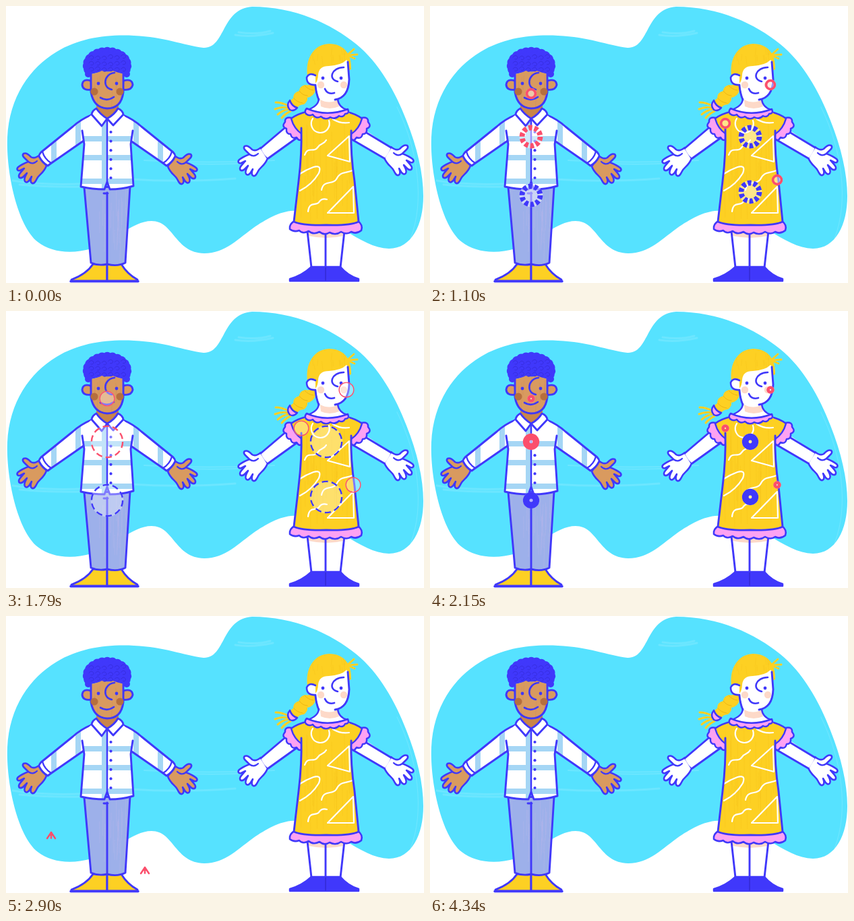
Animation of 620 by 411 pixels, one loop 4.57 s. Source, as an HTML page with a canvas:

```html
<!DOCTYPE html>
<html lang="en">
<head>
<meta charset="utf-8">
<title>Two kids</title>
<style>
html, body { margin: 0; width: 620px; height: 411px; overflow: hidden; background: #fff; }
canvas { display: block; }
</style>
</head>
<body>
<canvas id="stage" width="620" height="411"></canvas>
<script>
const LOOP = 4570;
const INK = '#4038fb', RED = '#fb4f6c', TAN = '#d99a5f', SKY = '#56e2ff';
const YELLOW = '#fdd023', PINK = '#fda2f3', PEACH = '#fdd9c8', STRIPE = '#a5d6f5';
const stage = document.getElementById('stage').getContext('2d');
const still = document.createElement('canvas');
still.width = 620;
still.height = 411;
const g = still.getContext('2d');
g.lineCap = g.lineJoin = 'round';

function shape(d, fill, line, width = 2.9) {
  const p = new Path2D(d);
  if (fill) { g.fillStyle = fill; g.fill(p); }
  if (line) { g.strokeStyle = line; g.lineWidth = width; g.stroke(p); }
}

function dot(x, y, r, fill) {
  g.beginPath();
  g.arc(x, y, r, 0, Math.PI * 2);
  g.fillStyle = fill;
  g.fill();
}

function placed(dx, dy, flip, draw) {
  g.save();
  g.translate(dx, dy);
  if (flip) g.scale(-1, 1);
  draw();
  g.restore();
}

function clipped(d, draw) {
  g.save();
  g.clip(new Path2D(d));
  draw();
  g.restore();
}

let seed = 7;
function rnd() {
  seed = (seed * 16807) % 2147483647;
  return seed / 2147483647;
}

// Faint dry-brush lines inside the current clip.
function grain(x, y, w, h, n, color) {
  for (let i = 0; i < n; i++) {
    const a = x + rnd() * w, b = y + rnd() * h * 0.6;
    shape(`M${a} ${b}l${rnd() * 3 - 1.5} ${h * (0.2 + rnd() * 0.3)}`, null, color, 0.8);
  }
}

function hand(fill) {
  shape('M50 221C45 225 40 226 37 224C34 221 30 217 26 219C23 222 27 225 29 227L33 231' +
    'C28 233 22 236 18 239C15 242 17 245 21 244L27 241C23 246 19 249 19 252' +
    'C19 256 23 256 26 253L31 248C28 253 26 257 28 260C30 263 33 261 35 258' +
    'L38 253C36 258 36 262 39 263C42 264 44 260 46 256C49 250 56 248 60 237Z', fill, INK, 2.6);
  shape('M33 231Q40 236 46 230', null, INK, 2.2);
}

function background() {
  const blob = 'M2 195C5 135 35 92 75 68C110 47 150 42 190 44C235 46 262 58 293 62' +
    'C326 63 319 4 365 1C428 1 482 26 520 57C553 84 577 126 594 170C610 210 619 249 619 282' +
    'C619 324 602 360 568 360C525 359 482 309 440 304C412 301 392 313 370 327' +
    'C344 345 326 367 294 367C250 366 249 319 216 319C186 319 161 351 127 360' +
    'C95 369 67 365 47 350C17 326 0 247 2 195Z';
  shape(blob, SKY);
  clipped(blob, () => {
    const brush = 'rgba(255,255,255,.13)';
    shape('M340 43Q365 47 396 40M345 39Q372 43 392 37', null, brush, 3);
    shape('M205 229Q300 234 398 229M230 232Q300 237 362 233', null, brush, 2);
    shape('M10 259Q50 266 110 264M20 265Q65 269 112 268M185 257Q260 262 340 256', null, brush, 3);
    shape('M580 150C612 215 621 290 600 345', null, brush, 1.2);
  });
}

function boy() {
  // Shoes and trousers
  shape('M129 383Q119 398 97 406V408H150V383Z', YELLOW, INK);
  shape('M171 383Q180 398 195 406V408H150V383Z', YELLOW, INK);
  shape('M96 408.5H196', null, INK, 3.4);
  const legs = 'M116 269L126 381Q138 386 150 383Q165 387 177 381L184 268Z';
  shape(legs, '#9db0ea');
  clipped(legs, () => grain(116, 268, 68, 116, 28, 'rgba(188,183,232,.4)'));
  shape(legs, null, INK);
  shape('M150 277V383M145 278H151', null, INK);

  hand(TAN);
  placed(300, 1, true, () => hand(TAN));

  // Shirt
  const sleeve = 'M128 161Q111 168 99 179L52 217Q49 220 49 223Q54 233 62 237L66 234L115 200L126 178Z';
  function arm() {
    shape(sleeve, '#fff');
    clipped(sleeve, () => shape('M107 165V215M71 195V238', null, STRIPE, 8));
    shape(sleeve, null, INK);
    shape('M54 216Q57 227 67 233', null, INK, 2.4);
  }
  arm();
  placed(300, 0, true, arm);
  const side = 'L116 205L111 268Q128 272 146 272L150 261L154 272Q172 272 189 267L185 205L188 185';
  const body = 'M128 161Q118 166 113 185' + side + 'Q182 166 172 161Z';
  shape(body, '#fff');
  clipped(body, () => {
    shape('M110 197H190M110 225H190M110 260H190', null, STRIPE, 8);
    shape('M145.5 165V275', null, STRIPE, 7);
  });
  shape('M113 185' + side, null, INK);
  shape('M150 167V261', null, INK, 2.5);
  for (let i = 0; i < 6; i++) dot(155.5, 187 + i * 13.6, 2.1, INK);

  // Neck and collar
  shape('M134 143V156L150 167L167 156V143Z', '#c98549');
  shape('M134 152Q128 155 127 161L142 178L150 167Q140 161 134 152Z', '#fff', INK);
  shape('M166 152Q173 155 174 161L159 177L150 167Q161 161 166 152Z', '#fff', INK);

  // Hair
  for (let i = 0; i <= 14; i++) {
    const a = Math.PI * (0.9 + i * 0.086);
    dot(150 + Math.cos(a) * 29, 88 + Math.sin(a) * 20, 7.2, INK);
  }
  shape('M121 103Q114 70 150 68Q186 70 180 103Q150 92 121 103Z', INK);
  dot(122, 101, 5, INK);
  dot(179, 101, 5, INK);

  // Head
  shape('M126 111Q114 107 113 117Q114 126 127 124Z', TAN, INK);
  shape('M174 111Q187 107 188 117Q186 126 173 124Z', TAN, INK);
  const face = 'M126 101Q137 99 142 96Q150 99 158 96Q166 99 175 101L174 128Q171 152 150 152Q130 151 126 128Z';
  shape(face, TAN);
  clipped(face, () => grain(126, 96, 50, 56, 14, 'rgba(196,137,80,.35)'));
  shape('M126 100V128Q130 151 150 152Q171 152 174 128V100', null, INK);
  for (let i = 0; i < 18; i++) {
    const x = 123 + (i % 6) * 9.5, y = 74 + (i / 6 | 0) * 9 + rnd() * 3;
    shape(`M${x} ${y}q4 -5 7 0q0 4 -4 3`, null, '#372ee0', 1);
  }
  dot(131, 127, 5.5, '#b66f3e');
  dot(169, 127, 5.5, '#b66f3e');
  dot(137, 115, 2.4, INK);
  dot(164, 115, 2.4, INK);
  shape('M161 99C144 101 143 122 157 124', null, INK, 2.6);
  shape('M140 136Q150 142 160 135', null, INK, 2.7);
}

function sleeve() {
  shape('M424 166Q413 164 414 172Q408 179 416 182Q415 190 422 190Q424 198 431 195Q436 203 440 195' +
    'L440 189Q428 181 424 166Z', PINK, INK, 2.5);
  shape('M446 157Q432 160 423 167Q427 182 439 190L455 164Z', YELLOW, INK, 2.5);
}

function girl() {
  // Legs and shoes
  shape('M447 334L453 388H496L502 334Z', '#fff');
  shape('M448 334L449 341Q475 347 501 341V334Z', PEACH);
  shape('M447 334L453 388M474 336V388M502 334L496 388', null, INK);
  shape('M453 387H496Q507 400 523 405V408H421V405Q439 400 453 387Z', INK, INK, 2.5);
  shape('M474 388V407', null, '#2f27c9', 1.2);

  // Arms
  placed(328, -11, false, () => hand('#fff'));
  placed(621, -12, true, () => hand('#fff'));
  shape('M418 175L378 211Q382 221 389 226L436 194Z', '#fff');
  shape('M418 177L378 211M389 226L435 193', null, INK);
  shape('M524 178L571 210Q566 222 561 226L513 198Z', '#fff');
  shape('M528 184L571 210M561 226L513 198', null, INK);

  sleeve();
  placed(951, 0, true, sleeve);

  // Dress
  shape('M428 319Q420 323 421 331Q427 336 435 333Q440 339 449 334Q456 340 465 335Q472 341 480 336' +
    'Q489 341 497 335Q505 340 512 335Q519 339 527 333Q530 325 522 319Z', PINK, INK, 2.6);
  const dress = 'M446 157Q436 161 438 181Q439 220 434 260L427 320Q440 326 475 325Q511 326 523 320' +
    'L517 260Q511 220 512 185Q516 162 506 156Z';
  shape(dress, YELLOW);
  clipped(dress, () => {
    grain(430, 165, 90, 158, 36, 'rgba(238,187,24,.35)');
    shape('M455 167A13.5 13.5 0 1 0 479 170M485 168Q496 175 509 173', null, '#fff', 2.2);
    shape('M443 221C448 207 456 219 463 209C467 203 471 206 475 199M509 193L477 222L510 231Z', null, '#fff', 2.2);
    shape('M436 274Q454 265 464 248Q469 235 456 239Q445 243 436 249', null, '#fff', 2.2);
    shape('M468 273C471 257 485 266 490 257C496 245 502 249 514 244', null, '#fff', 2.2);
    shape('M515 268L477 307H516ZM448 305C450 288 461 298 465 290Q469 285 476 287', null, '#fff', 2.2);
  });
  shape('M438 181Q439 220 434 260L427 320Q440 326 475 325Q511 326 523 320L517 260Q511 220 512 185', null, INK);

  // Neck and collar
  shape('M460 120L464 138Q463 149 447 154Q475 168 506 154Q493 150 492 136Z', '#fff');
  shape('M466 139Q480 146 492 139L494 149Q480 155 467 149Z', PEACH);
  shape('M464 138Q463 149 447 154M492 138Q493 150 506 154', null, INK, 2.5);
  shape('M446 152Q442 156 445 160Q450 164 455 161Q460 168 467 164Q474 170 481 165Q488 169 494 163' +
    'Q500 166 503 160Q510 160 507 153Q475 165 446 152Z', PINK, INK, 2.5);

  // Braid
  shape('M419 148Q409 143 400 143M419 151Q409 149 399 153M420 153Q411 154 403 161M422 156Q415 159 409 166', null, YELLOW, 3);
  shape('M456 112Q452 119 444 117Q435 119 435 126Q426 128 426 137Q420 140 421 146L431 152' +
    'Q435 146 442 146Q448 141 447 136Q457 134 459 125Z', YELLOW);
  shape('M435 126Q440 133 447 133M427 137Q432 143 440 144M443 118Q448 124 456 125', null, '#edb613', 1);
  shape('M421 140Q415 147 421 154Q427 157 432 151Q424 149 421 140Z', PINK, INK, 2.5);

  // Head
  shape('M447 103C444 77 457 57 479 56C501 56 513 71 512 94L500 99L460 116Z', YELLOW);
  shape('M508 83L509 109Q508 139 483 139Q463 138 458 116Q463 111 463 102Q464 89 479 89Q497 88 505 80Z', '#fff');
  clipped('M447 103C444 77 457 57 479 56C501 56 513 71 508 83Q482 86 464 97Z',
    () => grain(450, 60, 56, 34, 14, 'rgba(238,187,24,.35)'));
  shape('M507 83L509 109Q508 136 488 139M459 118Q460 130 464 139', null, INK);
  shape('M459 103Q450 98 446 106Q446 118 459 117Z', '#fff');
  shape('M459 103Q450 98 446 106Q446 118 459 117', null, INK, 2.6);
  shape('M507 72L516 64M508 73L521 72M508 74L517 78', null, YELLOW, 3);
  dot(467, 117, 5.2, PEACH);
  dot(501, 117, 5.2, PEACH);
  dot(470, 107, 2.4, INK);
  dot(497, 107, 2.4, INK);
  shape('M501 91C483 91 477 109 492 112', null, INK, 2.6);
  shape('M473 123Q477 132 487 129', null, INK, 2.7);
}

background();
boy();
girl();

// x, y, full radius, colour
const spots = [
  [150, 130, 12.4, RED], [150, 194, 26, RED], [150, 281, 26, INK],
  [505, 117, 12.4, RED], [438, 174, 12.4, RED], [515, 258, 12.4, RED],
  [475, 194, 26, INK], [475, 276, 26, INK]
];
const clamp = v => Math.max(0, Math.min(1, v));

// A disc grows evenly while its hole opens into a thin ring.
function ripple([x, y, full, color], p) {
  const big = full > 20, r = full * p;
  if (r < 0.3) return;
  const hole = r * clamp((p - 0.353) * 1.75);
  const w = Math.min(r, Math.max(big ? 2.4 : 1.4, r - hole));
  const mid = r - w / 2, step = mid * Math.PI / 5;
  stage.beginPath();
  stage.arc(x, y, r, 0, Math.PI * 2);
  stage.fillStyle = `rgba(255,255,255,${0.8 - 0.5 * p})`;
  stage.fill();
  stage.setLineDash(big && p > 0.6 ? [step * 0.64, step * 0.36] : []);
  stage.lineCap = 'butt';
  stage.beginPath();
  stage.arc(x, y, mid, 0, Math.PI * 2);
  stage.strokeStyle = color;
  stage.lineWidth = w;
  stage.stroke();
  stage.setLineDash([]);
}

// The head pops up off its stem, then the arrow drifts and fades.
function arrow(x, y, ms) {
  const drift = clamp((ms - 60) / 660), out = clamp((ms - 540) / 180);
  const tip = y - (ms < 60 ? 0 : 5.5) - 4 * drift;
  stage.globalAlpha = 1 - out;
  stage.strokeStyle = RED;
  stage.lineWidth = 2.5;
  stage.lineCap = stage.lineJoin = 'round';
  stage.beginPath();
  stage.moveTo(x - 6, tip + 9);
  stage.lineTo(x, tip);
  stage.lineTo(x + 6, tip + 9);
  stage.moveTo(x, tip);
  stage.lineTo(x, y + 8.5 - 4 * drift);
  stage.stroke();
  stage.globalAlpha = 1;
}

function draw(t) {
  stage.drawImage(still, 0, 0);
  if (t >= 230 && t < 2510) {
    const p = (t - 230) % 570 / 450;
    if (p < 1) spots.forEach(s => ripple(s, p));
  }
  if (t >= 2900 && t < 4340) {
    const ms = (t - 2900) % 720;
    arrow(67, 321, ms);
    arrow(206, 373, ms);
  }
}

const start = performance.now();
function tick() {
  const t = (performance.now() - start) % LOOP;
  stage.fillStyle = '#fff';
  stage.fillRect(0, 0, 620, 411);
  draw(t);
  requestAnimationFrame(tick);
}
tick();
</script>
</body>
</html>
```
